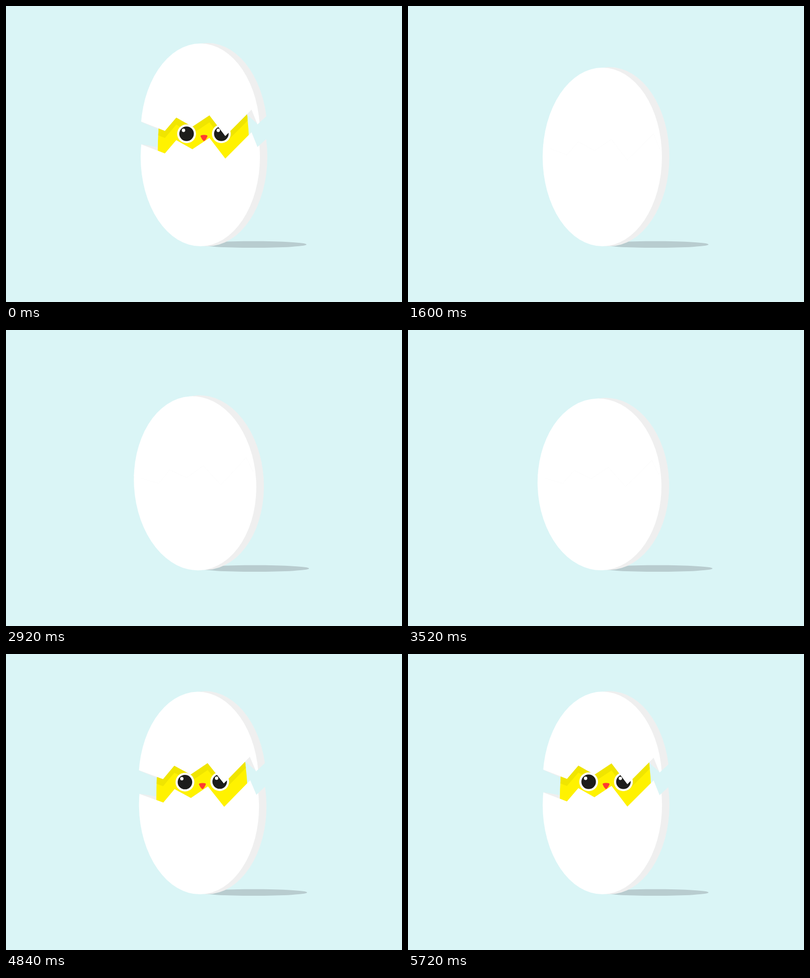
These frames come from a looping animation (800 px wide and 600 px high, 5760 ms). An HTML page with a canvas:

```html
<!DOCTYPE html>
<html lang="en">
<head>
<meta charset="utf-8">
<title>Hatching egg</title>
<style>
  html, body { margin: 0; width: 100%; height: 100%; overflow: hidden; background: #daf5f6; }
  canvas { display: block; width: 800px; height: 600px; }
</style>
</head>
<body>
<canvas id="stage" width="800" height="600"></canvas>
<script>
const ctx = document.getElementById('stage').getContext('2d');
const STEP = 40, STEPS = 144;
const PIVOT = { x: 392.5, y: 487 };
const WHITE = '#ffffff', GREY = '#efefef';
const OPEN = 49, OVERLAP = 3;

// Crack line of the lower shell, from left to right
const CRACK = [[240, 267.6], [321, 299], [344, 272], [376.5, 290.5], [411, 267.5],
               [443, 309.5], [496, 256], [508, 286], [540, 256.5]];

// Eased 0 to 1 between steps a and b
function ramp(s, a, b) {
  const p = Math.min(1, Math.max(0, (s - a) / (b - a)));
  return (1 - Math.cos(Math.PI * p)) / 2;
}

// Eased 0 to 1 and back to 0 between steps a and b
function bump(s, a, b) {
  return ramp(s, a, (a + b) / 2) - ramp(s, (a + b) / 2, b);
}

// Wave that peaks at the given step
function wave(s, peak, period) {
  return Math.cos(2 * Math.PI * (s - peak) / period);
}

// Fading strength of the bounce after the egg pops open
function popStrength(s) {
  return ramp(s, 109, 116) * Math.pow((STEPS - s) / 28, 1.2);
}

function squashAt(s) {
  const breath = .016 * bump(s, 0, 14) + .03 * bump(s, 14, 28);
  const wobble = .04 * wave(s, 75, 13.7) * ramp(s, 51, 60) * (1 - ramp(s, 95, 102));
  const pop = .04 * wave(s, 124.5, 16) * popStrength(s);
  return breath + wobble + pop;
}

function tiltAt(s) {
  const sway = -.8 * bump(s, 0, 14) - 1.9 * bump(s, 19, 40);
  const growth = 3.4 + .12 * (s - 72.5);
  const wobble = -growth * wave(s, 72.5, 19.2) * ramp(s, 51, 62) * (1 - ramp(s, 93, 110));
  const pop = -3.4 * wave(s, 123.8, 14) * popStrength(s);
  return sway + wobble + pop;
}

function liftAt(s) {
  return OPEN * (1 - ramp(s, 14, 28) + ramp(s, 109, 116.5)) + 2 * bump(s, 109, 133);
}

function ellipse(x, y, rx, ry, color) {
  ctx.fillStyle = color;
  ctx.beginPath();
  ctx.ellipse(x, y, rx, ry, 0, 0, Math.PI * 2);
  ctx.fill();
}

function polygon(points, color) {
  ctx.beginPath();
  points.forEach(([x, y]) => ctx.lineTo(x, y));
  ctx.closePath();
  if (color) {
    ctx.fillStyle = color;
    ctx.fill();
  }
}

function squashed(amount, paint) {
  ctx.save();
  ctx.translate(PIVOT.x, PIVOT.y);
  ctx.scale(1 + amount, 1 - amount);
  ctx.translate(-PIVOT.x, -PIVOT.y);
  paint();
  ctx.restore();
}

// Area above (edge = 0) or below (edge = 600) the crack line
function crackArea(dy, edge) {
  return [[240, edge], ...CRACK.map(([x, y]) => [x, y + dy]), [540, edge]];
}

function shell(dy, area) {
  ctx.save();
  polygon(area);
  ctx.clip();
  ellipse(407, 305.5 + dy, 121, 181.5, GREY);
  ellipse(392.5, 306 + dy, 120.5, 181, WHITE);
  ctx.restore();
}

function innerRims(lift) {
  const up = OPEN - lift;
  polygon([[273.5, 235 + up], [308, 250 + up], [330, 250 + up], [330, 235 + up]], GREY);
  polygon([[486, 215 + up], [489, 222 + up], [507, 238 + up], [496, 210 + up]], GREY);
  polygon([[272.5, 280], [308, 286.5], [321, 299]], GREY);
}

function eye(x, y) {
  ellipse(x, y, 19, 19, WHITE);
  ellipse(x, y, 14.7, 14.7, '#1d1d1b');
  ellipse(x - 6.2, y - 7, 3.4, 3.4, WHITE);
}

function beak() {
  ctx.fillStyle = '#ff3b2f';
  ctx.beginPath();
  ctx.moveTo(394.5, 262);
  ctx.quadraticCurveTo(400, 260.6, 405.5, 262);
  ctx.quadraticCurveTo(407.5, 262.6, 406.6, 265);
  ctx.quadraticCurveTo(404.5, 270, 401.4, 273);
  ctx.quadraticCurveTo(400, 274.4, 398.6, 273);
  ctx.quadraticCurveTo(395.5, 270, 393.4, 265);
  ctx.quadraticCurveTo(392.5, 262.6, 394.5, 262);
  ctx.fill();
}

// The chick keeps its size; only the shade of the shell follows the squash
function chick(lift, squash) {
  const dy = 40 * squash;
  ctx.save();
  ctx.beginPath();
  ctx.rect(290, 190, 220, 170);
  ctx.clip();
  ctx.beginPath();
  ctx.ellipse(399, 300 + dy, 92.5, 260, 0, 0, Math.PI * 2);
  ctx.clip();
  ctx.fillStyle = '#fff200';
  ctx.fillRect(290, 190, 220, 170);
  squashed(squash, () => polygon(crackArea(OVERLAP - lift + 14.5, 0), '#f0e500'));
  ctx.restore();

  ctx.save();
  ctx.translate(0, dy);
  eye(364.8, 259);
  eye(435, 259);
  beak();
  ctx.restore();
}

function draw(s) {
  const squash = squashAt(s);
  const lift = liftAt(s);

  ctx.fillStyle = '#daf5f6';
  ctx.fillRect(0, 0, 800, 600);

  ctx.save();
  ctx.translate(PIVOT.x, 0);
  ctx.scale(1 + squash, 1);
  ellipse(107.5, 483.4, 107, 6.7, '#b8cccf');
  ctx.restore();

  ctx.save();
  ctx.translate(PIVOT.x, PIVOT.y);
  ctx.rotate(tiltAt(s) * Math.PI / 180);
  ctx.translate(-PIVOT.x, -PIVOT.y);
  if (lift > .01) {
    squashed(squash, () => innerRims(lift));
    chick(lift, squash);
  }
  squashed(squash, () => {
    shell(0, crackArea(0, 600));
    shell(-lift, crackArea(OVERLAP - lift, 0));
  });
  ctx.restore();
}

const start = performance.now();
function tick() {
  draw(Math.floor((performance.now() - start) / STEP) % STEPS);
  requestAnimationFrame(tick);
}
tick();
</script>
</body>
</html>
```
